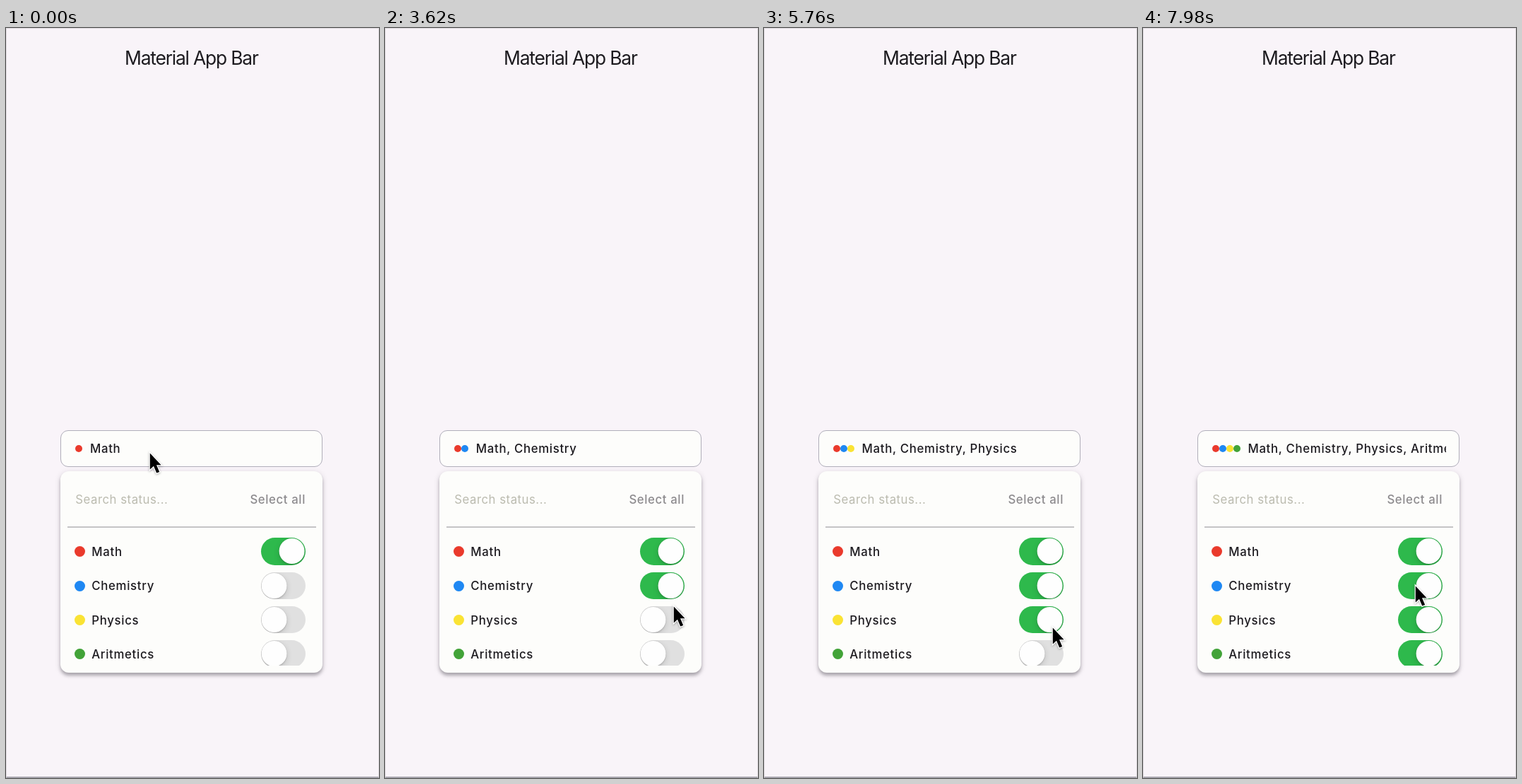
An HTML page that plays this animation: 528x1061 px, repeating every 8 s.

```html
<!DOCTYPE html>
<html lang="en">
<head>
<meta charset="utf-8">
<title>Multi select dropdown</title>
<style>
@property --chem { syntax: "<number>"; inherits: true; initial-value: 0; }
@property --phys { syntax: "<number>"; inherits: true; initial-value: 0; }
@property --arit { syntax: "<number>"; inherits: true; initial-value: 0; }

* { box-sizing: border-box; }
html, body { margin: 0; width: 100%; height: 100%; overflow: hidden; }
body {
  position: relative;
  background: #f9f4f9;
  color: #1d1b20;
  font: 500 16.8px/24px Inter, "Open Sans", sans-serif;
  font-optical-sizing: none;
  letter-spacing: .68px;
  white-space: nowrap;
  animation: chem 8s infinite, phys 8s infinite, arit 8s infinite;
}
body * { position: absolute; }
.edge { inset: 0; border: 1px solid #dfdbe0; border-bottom: 2px solid #aaa7b0; }

h1 {
  left: 168px; top: 26px; margin: 0;
  font-size: 26.4px; font-weight: 400; line-height: 32px; letter-spacing: -1.18px;
}

.field {
  left: 77px; top: 569px; width: 371px; height: 52px;
  border: 1px solid #b0aeba; border-radius: 11px; background: #fdfdfb;
}
.field i { left: calc(20px + var(--n) * 10px); top: 20px; width: 10px; height: 10px; }
.value { left: 0; top: 13px; width: 351px; height: 26px; overflow: hidden; }
.value p {
  margin: 0; left: 41px; top: 0;
  transform: translateX(calc(9.8px * (min(1, var(--chem) * 9999) + min(1, var(--phys) * 9999) + min(1, var(--arit) * 9999))));
}
.value span { position: static; }
.field i, .value span { opacity: min(1, calc(var(--on) * 9999)); }

.panel {
  left: 77px; top: 627px; width: 371px; height: 285px;
  border-radius: 12px; background: #fdfdfb;
  box-shadow: 0 4px 4px rgba(40, 36, 46, .3), 0 2px 8px rgba(40, 36, 46, .15);
}
.search { left: 21.3px; top: 28px; font-weight: 400; letter-spacing: .5px; color: #bbbbaf; }
.all { left: 268.4px; top: 28px; letter-spacing: .6px; color: #8d8b8e; }
hr { left: 10px; top: 78px; width: 352px; height: 1.5px; margin: 0; border: 0; background: #c5c4c6; }

.list { left: 0; top: 89px; width: 371px; height: 186px; overflow: hidden; }
.row { left: 0; top: calc(5.4px + var(--n) * 48.3px); width: 100%; height: 38.4px; }
.row i { left: 20px; top: 12px; width: 15px; height: 15px; }
.row b { left: 44.3px; top: 7.6px; font-weight: 500; }
i { border-radius: 50%; background: var(--c); }

/* track fades from translucent grey to solid green */
.switch {
  left: 284px; top: 0; width: 63px; height: 38.4px; border-radius: 20px; overflow: hidden;
  background: rgb(calc(120 - 74 * var(--on)) calc(120 + 65 * var(--on)) calc(128 - 52 * var(--on)) / calc(.22 + .78 * var(--on)));
}
.switch s {
  left: 1px; top: 1px; width: 36px; height: 36px;
  border-radius: 50%; background: #fefefe;
  box-shadow: 0 3px 8px rgba(0, 0, 0, .15), 0 2px 1.5px rgba(0, 0, 0, .08), 0 0 1px rgba(0, 0, 0, .25);
  transform: translateX(calc(var(--on) * 25px - .4px));
}

.math { --n: 0; --on: 1; --c: #ea3a2c; }
.chem { --n: 1; --on: var(--chem); --c: #1f88f3; }
.phys { --n: 2; --on: var(--phys); --c: #fae334; }
.arit { --n: 3; --on: var(--arit); --c: #42a338; }

.cursor {
  left: -1px; top: 0; width: 24px; height: 36px; overflow: visible;
  filter: drop-shadow(0 1.5px 1.5px rgba(0, 0, 0, .3));
  animation: move 8s infinite ease-in-out;
}

/* taps near 2.70 s, 5.06 s and 6.66 s, each switch sliding for 200 ms */
@keyframes chem {
  0% { --chem: 0; }
  33.75% { --chem: 0; animation-timing-function: ease; }
  36.25%, 100% { --chem: 1; }
}
@keyframes phys {
  0% { --phys: 0; }
  63.3% { --phys: 0; animation-timing-function: ease; }
  65.8%, 100% { --phys: 1; }
}
@keyframes arit {
  0% { --arit: 0; }
  83.3% { --arit: 0; animation-timing-function: ease; }
  85.8%, 100% { --arit: 1; }
}
@keyframes move {
  0%, 4% { transform: translate(204px, 600px); }
  13% { transform: translate(446px, 820px); }
  16% { transform: translate(441px, 814px); }
  22%, 42% { transform: translate(409px, 795px); }
  45.25% { transform: translate(409px, 817px); }
  49%, 72% { transform: translate(409px, 847px); }
  78%, 89% { transform: translate(409px, 888px); }
  97.5%, 100% { transform: translate(386px, 788px); }
}
</style>
</head>
<body>
<div class="edge"></div>
<h1>Material App Bar</h1>

<div class="field">
  <i class="math"></i><i class="chem"></i><i class="phys"></i><i class="arit"></i>
  <div class="value"><p>Math<span class="chem">, Chemistry</span><span class="phys">, Physics</span><span class="arit">, Aritmetics</span></p></div>
</div>

<div class="panel">
  <div class="search">Search status...</div>
  <div class="all">Select all</div>
  <hr>
  <div class="list">
    <div class="row math"><i></i><b>Math</b><div class="switch"><s></s></div></div>
    <div class="row chem"><i></i><b>Chemistry</b><div class="switch"><s></s></div></div>
    <div class="row phys"><i></i><b>Physics</b><div class="switch"><s></s></div></div>
    <div class="row arit"><i></i><b>Aritmetics</b><div class="switch"><s></s></div></div>
  </div>
</div>

<svg class="cursor" viewBox="0 0 24 36">
  <path d="M.8 1.4V24.6L6 19.7L10.2 29.6L14.2 27.9L10 18.2H16.6Z" stroke="#fff" stroke-width="2.4" paint-order="stroke"/>
</svg>
</body>
</html>
```
